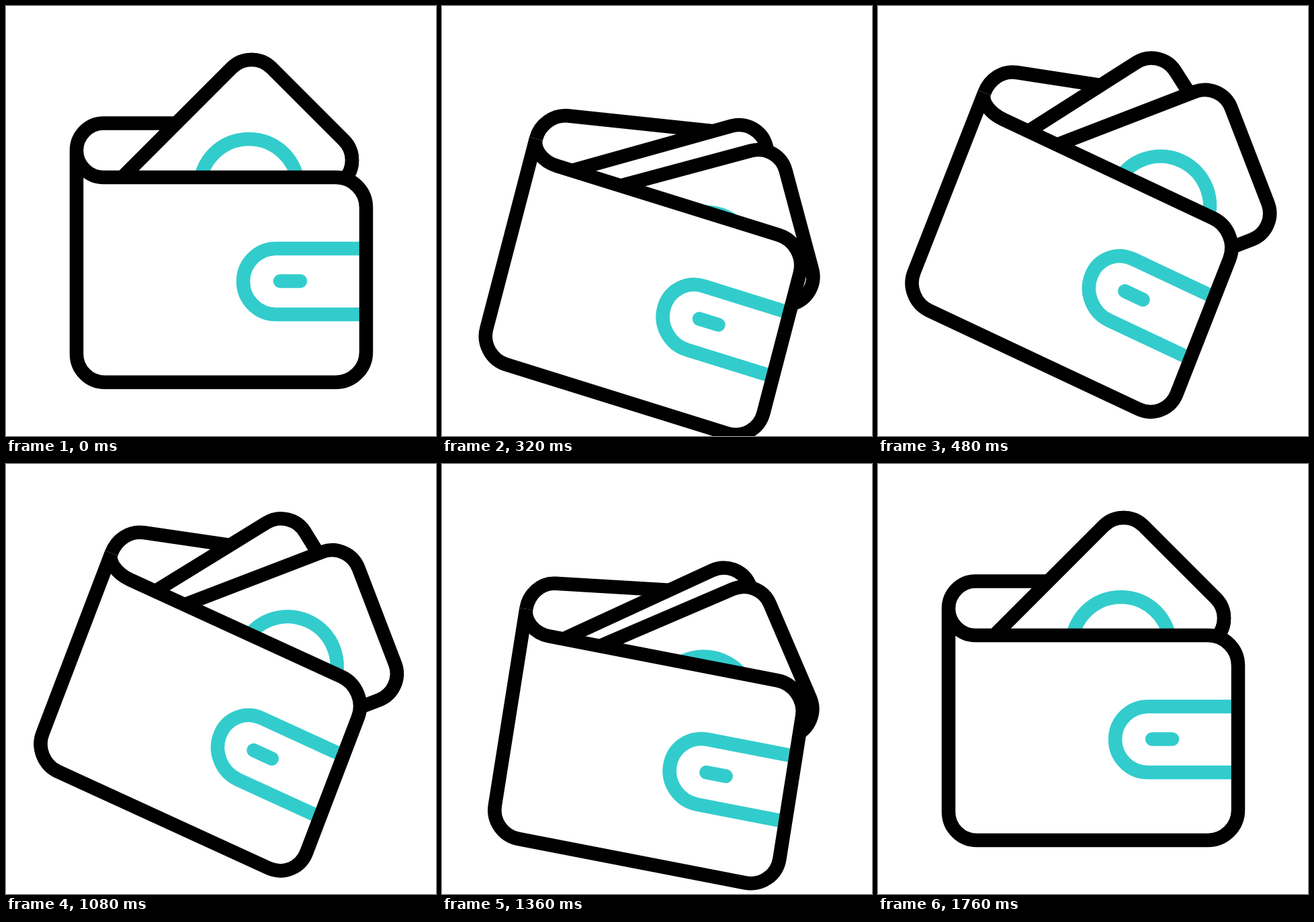
Recreate the animation shown at these times as an HTML page with a canvas. Size 640 px wide and 640 px high, loop 2 s.

```html
<!DOCTYPE html>
<html lang="en">
<head>
<meta charset="utf-8">
<title>Wallet</title>
<style>
  html, body { margin: 0; height: 100%; overflow: hidden; background: #fff; }
  canvas { display: block; }
</style>
</head>
<body>
<canvas id="stage" width="640" height="640"></canvas>
<script>
const ctx = document.getElementById('stage').getContext('2d');
const TEAL = '#33cccc', RAD = Math.PI / 180, LOOP = 2000, STEP = 40;

// Pose: wallet x, y, x-axis angle, y-axis angle, fold height,
// flap bend x, y, flap end x, y, front card x, y, angle, back card x, y, angle.
// Flap and cards are relative to the wallet's top left corner.
const closed   = [105, 255, 0, 0, 40, 40, -80.5, 165, -80.5, 260.5, -192.5, 45, 260.5, -192.5, 45];
const dipOut   = [116, 258, 8, 6.6, 35, 47, -72, 225, -62, 335, -85, 64, 320, -110, 63];
const swingOut = [132.5, 226, 17.3, 14.6, 29.5, 55.5, -62.5, 287.5, -38, 368.2, -21.4, 75, 338.6, -58.7, 74.4];
const open     = [149.5, 151.5, 25.2, 21.4, 24, 57.5, -52.5, 200.5, -30.5, 361, -39, 68.9, 270.4, -90, 57.5];
const swingIn  = [131, 208, 16.9, 14, 29, 54, -63.5, 254, -46, 365.2, -49, 70.1, 316.3, -88.5, 66];
const dipIn    = [118.5, 252, 10, 8.2, 34, 48, -72, 230, -62, 348, -85, 66, 320, -112, 65];
const settle   = [110, 261.5, 3.4, 2.8, 38.5, 42, -78, 210, -75.2, 313.4, -130.4, 58, 306.4, -146.4, 58];

const keys = [
  [0, closed], [200, dipOut], [320, swingOut], [480, open], [1040, open],
  [1240, swingIn], [1380, dipIn], [1520, settle], [1750, closed], [LOOP, closed]
];

// Monotone cubic interpolation, flat at the turning points.
function slope(i, j) {
  if (i === 0 || i === keys.length - 1) return 0;
  const rate = k => (keys[k + 1][1][j] - keys[k][1][j]) / (keys[k + 1][0] - keys[k][0]);
  const a = rate(i - 1), b = rate(i);
  return a * b > 0 ? 2 * a * b / (a + b) : 0;
}

function poseAt(t) {
  let i = 0;
  while (t >= keys[i + 1][0]) i++;
  const [t0, from] = keys[i], [t1, to] = keys[i + 1];
  const d = t1 - t0, u = (t - t0) / d, e = u * u * (3 - 2 * u);
  return from.map((p, j) => p + (to[j] - p) * e
    + d * u * (1 - u) * ((1 - u) * slope(i, j) - u * slope(i + 1, j)));
}

// Strokes keep their width whatever transform shaped the path.
function stroke(color = '#000') {
  ctx.setTransform(1, 0, 0, 1, 0, 0);
  ctx.strokeStyle = color;
  ctx.stroke();
}

function card(x, y, angle, ringX) {
  const place = () => {
    ctx.setTransform(1, 0, 0, 1, x, y);
    ctx.rotate(angle * RAD);
    ctx.beginPath();
  };
  place();
  ctx.roundRect(0, 0, 236, 330, 42);
  ctx.fill();
  stroke();
  if (ringX) {
    place();
    ctx.arc(ringX, 150.5, 73.5, 0, 7);
    stroke(TEAL);
  }
}

function draw(t) {
  const [x, y, ax, ay, fold, bx, by, ex, ey, fx, fy, fa, kx, ky, ka] = poseAt(t);
  const ux = Math.cos(ax * RAD), uy = Math.sin(ax * RAD);
  const vx = -Math.sin(ay * RAD), vy = Math.cos(ay * RAD);
  const wallet = () => {
    ctx.setTransform(ux, uy, vx, vy, x, y);
    ctx.beginPath();
  };

  ctx.setTransform(1, 0, 0, 1, 0, 0);
  ctx.fillStyle = '#fff';
  ctx.fillRect(0, 0, 640, 640);
  ctx.lineWidth = 20.5;
  ctx.lineCap = 'butt';

  // Flap
  const len = Math.hypot(ex - bx, ey - by), reach = fold + 22;
  ctx.setTransform(1, 0, 0, 1, x, y);
  ctx.beginPath();
  ctx.moveTo(ex, ey);
  ctx.lineTo(bx, by);
  ctx.bezierCurveTo(bx - (ex - bx) / len * 22, by - (ey - by) / len * 22,
    -reach * vx, -reach * vy, -fold * vx, -fold * vy);
  stroke();

  card(x + kx, y + ky, ka);
  card(x + fx, y + fy, fa, 145 - ax / 5);

  const body = () => {
    wallet();
    ctx.moveTo(0, -fold);
    ctx.bezierCurveTo(0, -fold * .45, 18, 0, 40, 0);
    ctx.arcTo(431, 0, 431, 305, 45);
    ctx.arcTo(431, 305, 0, 305, 45);
    ctx.arcTo(0, 305, 0, 0, 42);
    ctx.closePath();
  };
  body();
  ctx.fill();

  // Clasp
  wallet();
  ctx.moveTo(431, 106);
  ctx.arc(297, 155, 49, -Math.PI / 2, Math.PI / 2, true);
  ctx.lineTo(431, 204);
  stroke(TEAL);
  wallet();
  ctx.moveTo(303, 154.5);
  ctx.lineTo(333, 154.5);
  ctx.lineCap = 'round';
  stroke(TEAL);

  body();
  stroke();
}

function tick() {
  draw(Math.floor(performance.now() % LOOP / STEP) * STEP);
  requestAnimationFrame(tick);
}
tick();
</script>
</body>
</html>
```
